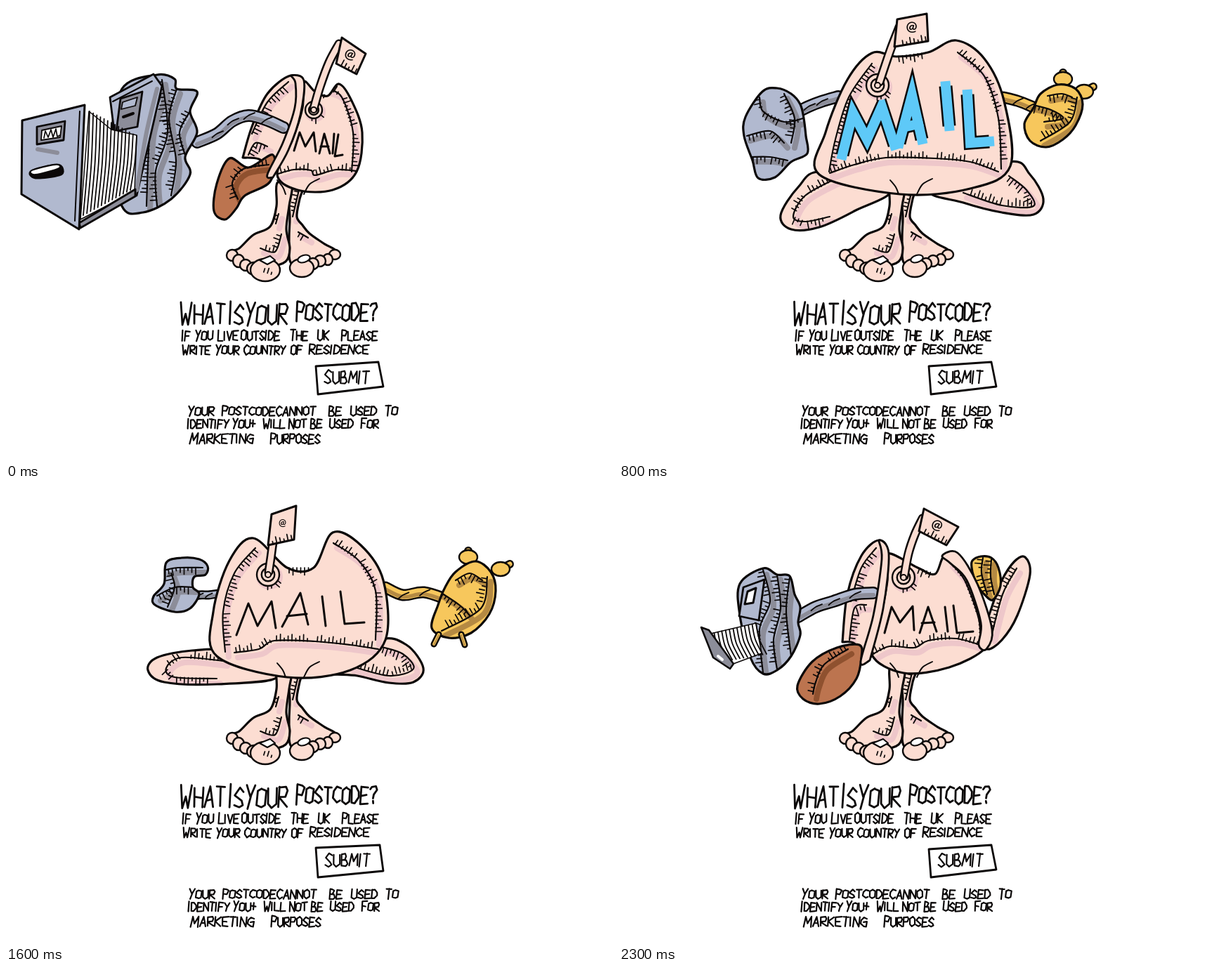
Write an HTML page with a canvas that moves like this. It is 864 px wide and 648 px high and loops after 2400 ms.

```html
<!DOCTYPE html>
<html lang="en">
<head>
<meta charset="utf-8">
<title>What is your postcode?</title>
<style>
html, body { margin: 0; width: 100%; height: 100%; overflow: hidden; background: #fff }
canvas { display: block }
</style>
</head>
<body>
<canvas width="864" height="648" role="img" aria-label="What is your postcode? If you live outside the UK please write your country of residence. Submit. Your postcode cannot be used to identify you &amp; will not be used for marketing purposes"></canvas>
<script>
const g = document.querySelector('canvas').getContext('2d');
const INK = '#0b0808', SKIN = '#fcddd2', PINK = '#eec7ca', STEEL = '#b1b9cf', SLATE = '#8c8d99',
  GOLD = '#f7c75c', OCHRE = '#b58a43', BROWN = '#bc744f', RUST = '#8f512f', WHITE = '#fff';
g.lineCap = g.lineJoin = 'round';

// "x,y x,y": smooth points; a trailing * makes one corner, a leading ! makes all corners
const pts = s => Array.isArray(s) ? s : s.replace('!', '').split(' ').flatMap(t => {
  const p = t.split(',').map(parseFloat);
  return s[0] == '!' || t.endsWith('*') ? [p, p] : [p];
});

function curve(p, closed) {
  const path = new Path2D(), n = p.length;
  const at = i => closed ? p[(i + n) % n] : p[Math.max(0, Math.min(n - 1, i))];
  path.moveTo(...p[0]);
  for (let i = 0; i < n - !closed; i++) {
    const [a, b, c, d] = [-1, 0, 1, 2].map(k => at(i + k));
    if (b[0] == c[0] && b[1] == c[1]) continue;
    path.bezierCurveTo(b[0] + (c[0] - a[0]) / 6, b[1] + (c[1] - a[1]) / 6,
      c[0] - (d[0] - b[0]) / 6, c[1] - (d[1] - b[1]) / 6, ...c);
  }
  if (closed) path.closePath();
  return path;
}
function stroke(path, w, color = INK) {
  g.lineWidth = w; g.strokeStyle = color; g.stroke(path);
}
const line = (s, w = 2.2, color) => stroke(curve(pts(s)), w, color);
function shape(s, fill, w = 2.8) {
  const path = curve(pts(s), true);
  g.fillStyle = fill; g.fill(path); stroke(path, w);
}
function oval(x, y, rx, ry, fill, w = 2.4, turn = 0) {
  g.beginPath(); g.ellipse(x, y, rx, ry, turn, 0, 7);
  g.fillStyle = fill; g.fill(); g.lineWidth = w; g.strokeStyle = INK; g.stroke();
}
// short strokes at right angles to the middle of a line
function comb(p, len = 8) {
  const path = new Path2D();
  let k = 0;
  for (let i = 1; i < p.length; i++) {
    const [x, y] = p[i - 1], dx = p[i][0] - x, dy = p[i][1] - y, d = Math.hypot(dx, dy);
    for (let s = 3; s < d * .85; s += 5.5, k++) {
      const l = len * (.75 + .35 * Math.sin(k * 2.1)) / d, u = s / d;
      path.moveTo(x + dx * u, y + dy * u);
      path.lineTo(x + dx * u - dy * l, y + dy * u + dx * l);
    }
  }
  stroke(path, 1.7);
}
function blob(s, fill, shade, lines = [], len = 8) {
  if (!s) return;
  const path = curve(pts(s), true);
  g.save();
  g.fillStyle = fill; g.fill(path); g.clip(path);
  g.translate(5, 7);
  lines.forEach(l => line(l, 8, shade));
  g.translate(-5, -7);
  lines.forEach(l => { comb(pts(l), len); line(l); });
  g.restore();
  stroke(path, 3.2);
}
function tube(s, fill, shade, w) {
  if (!s) return;
  const p = pts(s);
  line(p, w + 5); line(p, w, fill);
  line(p.map(([x, y]) => [x, y + w * .22]), w * .45, shade);
  for (let i = 1; i < p.length - 1; i++) {
    const [x, y] = p[i];
    line([[x + w * .7, y - w * .3], [x, y], [x - w * .5, y + w * .4]], 1.8);
  }
}
function files(n, x0, x1, y0, y1, b0, b1, lean) {
  for (let i = 0; i < n; i++) {
    const u = i / (n - 1), x = x0 + (x1 - x0) * u, y = y0 + (y1 - y0) * u, b = b0 + (b1 - b0) * u;
    line([[x, y], [x + lean * .3, (y + b) / 2], [x + lean, b]], 1.8);
  }
}

function cabinet() {
  shape('!148,130 210,97 222,114 186,270 166,276', STEEL);
  line('215,118 200,180 186,262', 6, SLATE);
  line('152,136 208,107', 2);
  shape('!163,132 194,122 187,172 157,178', SLATE);
  shape('!166,137 187,130 184,142 164,147', STEEL, 1.8);
  line('167,158 181,153', 4);
  shape('!118,150 150,176 186,184 183,264 106,304', WHITE, 1.5);
  files(14, 119, 186, 150, 185, 298, 262, -9);
  shape('!104,309 184,261 184,271 106,316', SLATE);
  shape('!23,163 112,141 104,318 22,268', STEEL, 3);
  line('105,150 98,306', 2);
  shape('!44,172 84,164 82,191 44,197', SLATE);
  shape('!51,177 79,171 77,187 50,191', WHITE, 1.8);
  line('!54,188 56,178 60,187 64,176 67,187 71,175 73,186 77,184', 1.7);
  line('45,204 73,209', 6, SLATE);
  shape('36,235 72,226 81,233 76,241 42,245', INK);
  shape('37,234 70,226 75,231 42,240', WHITE, 1.8);
}
function drawer() {
  shape('!177,140 207,129 199,187 171,181', STEEL);
  shape('!183,146 195,141 191,162 179,164', WHITE, 3);
  shape('!126,207 195,191 203,234 160,250', WHITE, 1.5);
  files(13, 130, 195, 206, 192, 246, 235, 15);
  shape('!117,197 128,201 163,249 158,256 134,240', SLATE, 2.5);
  line('141,238 147,243', 4, WHITE);
}
function alarm() {
  tube('658,245 645,268', GOLD, OCHRE, 4); oval(644, 269, 5, 5, WHITE);
  tube('703,246 712,272', GOLD, OCHRE, 4);
  tube('745,100 782,82 792,64', GOLD, OCHRE, 9); oval(793, 63, 9, 5, GOLD);
  shape('738,84 762,68 792,78 801,98 780,112 748,102', GOLD);
  oval(686, 49, 13, 8, GOLD); shape('!680,54 692,54 697,68 676,68', GOLD);
  shape('652,92 658,72 690,63 722,72 736,88 715,102 670,104', GOLD);
  oval(692, 88, 31, 10, OCHRE); line('!694,82 686,82 686,93 694,93', 2);
  line('686,88 692,88', 2);
  oval(700, 170, 79, 76, GOLD, 3); oval(704, 169, 70, 66, OCHRE);
  oval(710, 170, 63, 62, GOLD);
  comb(pts('650,160 665,135 695,120 730,125'), -9);
  oval(686, 170, 24, 20, OCHRE); oval(680, 169, 12, 11, GOLD);
  shape('!716,166 755,82 803,122 738,176', GOLD, 3.5);
  line('758,92 733,148', 6, OCHRE); comb(pts('735,150 780,120'), -9);
  shape('!690,200 716,277 768,250 734,192', GOLD, 3.5);
  line('718,212 727,262', 9, OCHRE); comb(pts('722,268 735,225'), 10);
  oval(712, 180, 29, 27, GOLD, 3.5); oval(713, 180, 14, 13, GOLD, 3);
}

// key drawings, ordered from the left-hand swing (0) to the right-hand swing (12)
const KEYS = [1, 2, 4, 7, 9, 11];
const POSES = [{
  body: '424,108 440,122 458,128 474,111 492,135 507,180 499,236 465,262 415,262 386,240 408,190 422,145',
  inner: ['384,240 410,233 434,234 440,241 470,233 499,235', '459,118 478,130 494,180 492,236'],
  inside: '337,216* 350,172 372,125 405,99 424,112 420,150 405,200 385,234 360,218',
  gills: ['350,182 372,137 402,108', '345,212 355,195 372,200'],
  rim: '406,99 424,106 419,155 402,205 380,244* 372,240 394,195 411,145 412,110',
  doorL: '380,212 345,230 318,217 300,253 296,292 312,304 328,288 340,270 376,250',
  dl: ['374,226 338,232 322,252 330,275'], tongue: 'L',
  hub: '438,148', pole: '438,146 447,115 460,80 474,54', flag: '!478,45 512,68 499,97 470,82',
  text: ['!410,206 418,180 426,200 438,180 441,207', '!446,210 453,182 461,210', '!448,200 459,200', '!467,182 465,210', '!473,183 468,214 479,212'],
  armL: '395,173 370,162 345,156 322,164 300,182 272,194',
  hand: '165,118 215,98 240,104 243,118 272,122 262,150 272,180 255,215 262,240 235,275 195,294 165,285 150,200',
  fingers: ['205,105 220,125 205,180 200,285', '222,105 230,180 213,235 215,285', '243,118 232,160 242,220 235,270', '262,150 247,180 256,215'],
  art: cabinet
}, {
  body: '382,92 425,112 450,121 466,94 502,125 527,190 522,226 470,254 405,262 360,236 372,185 382,130',
  inner: ['360,236 385,224 420,226 440,216 480,213 520,224', '470,104 492,130 512,185 514,220'],
  inside: '318,218* 325,150 345,95 370,73 383,95 372,180 355,245 335,220',
  gills: ['330,160 345,112 366,84', '328,215 335,170 352,165'],
  rim: '370,73 384,92 376,170 357,244* 344,246 362,180 374,100',
  rimR: '460,95 482,91 510,135 531,200 523,228 512,222 515,190 495,130 472,106',
  doorL: '342,222 310,226 275,246 254,280 262,299 285,306 315,295 338,270 345,240',
  dl: ['326,228 292,250 280,275 276,292'], tongue: 'L',
  doorR: '578,97 585,122 567,180 545,215 524,228 520,205 530,170 545,130 563,103',
  dr: ['566,113 546,150 530,210'],
  hub: '405,126', pole: '406,124 412,92 421,65 432,42', flag: '!434,28 483,54 466,80 427,60',
  text: ['!378,205 388,168 400,190 418,167 420,201', '!428,205 440,168 452,203', '!431,191 449,190', '!464,168 468,203', '!476,166 481,205 504,203'],
  armL: '362,148 335,150 305,160 280,168 255,182',
  hand: '172,135 205,113 225,122 243,124 250,150 258,168 255,190 258,208 245,238 225,258 205,263 187,240 172,180',
  fingers: ['205,115 215,160 200,200 205,262', '225,122 230,170 220,215 225,257', '243,126 238,175 245,238'],
  clock: '503,102 515,96 530,98 540,112 543,138 532,158 520,150 512,140 505,125 502,112',
  grip: ['518,98 516,120 524,150', '530,100 529,125 534,150'],
  art: drawer
}, {
  body: '365,67 385,88 440,85 468,54 510,76 543,140 549,222 500,260 400,268 322,230 318,170 333,100',
  inner: ['340,224 375,214 420,230 450,222 515,217 538,234', '357,92 337,130 328,180 336,222', '472,72 510,108 532,165 535,220'],
  doorL: '322,226 280,236 240,275 240,306 290,308 345,288 385,262',
  dl: ['345,235 290,245 252,278 255,298 295,298'],
  doorR: '548,206 600,208 645,230 630,254 560,266 490,268 445,258',
  dr: ['550,217 595,218 624,236 560,256 490,256'],
  hub: '381,112', pole: '383,108 389,80 396,55 407,34', flag: '!402,21 452,15 455,62 400,66',
  text: ['!342,203 352,162 369,191 384,157 396,206', '!402,182 410,138 445,180', '!400,172 439,168', '!465,137 469,189', '!484,142 490,192 520,190'],
  armL: '325,132 300,135 278,144 250,160',
  hand: '180,140 200,130 228,124 252,132 268,148 264,175 272,200 255,212 232,240 205,244 192,230 186,205 190,172',
  fingers: ['186,150 215,148 240,135', '190,175 215,190 188,205', '215,148 212,190 220,240', '240,150 245,185 255,212'],
  tail: '!165,196 186,190 192,240 175,245',
  armR: '537,126 560,122 585,129 610,124',
  clock: '605,88 630,82 655,92 672,120 668,150 650,178 625,187 602,176 595,150 600,115',
  grip: ['585,122 625,115 650,130 630,150', '664,100 660,145 625,178', '612,100 635,97 652,105'], bells: '625,76 662,95'
}, {
  body: '360,67 395,72 440,66 480,49 520,75 548,135 557,228 500,260 400,268 285,240 294,180 325,105',
  inner: ['300,238 335,226 380,216 450,217 500,222 540,236', '360,82 327,130 308,190 299,236', '482,66 520,100 540,160 544,232'],
  doorL: '288,236 255,258 230,298 245,318 285,315 335,292 385,262',
  dl: ['310,245 265,270 248,300 265,307 300,300'],
  doorR: '555,222 585,240 604,275 590,297 545,294 490,280 445,262',
  dr: ['555,242 580,262 590,285 545,284 490,266'],
  hub: '368,113', pole: '371,108 379,84 388,58 399,30', flag: '!396,19 438,11 440,50 392,58',
  text: ['!318,212 333,152 353,190 374,143 392,198', '!399,195 417,127 431,190', '!408,172 426,168', '!465,114 470,171', '!496,126 500,195 527,193'],
  armL: '312,129 288,136 270,143 250,153',
  hand: '204,122 225,117 245,125 258,140 263,160 266,185 268,210 245,222 222,244 198,245 190,220 178,185 180,158',
  fingers: ['200,130 205,150 235,165 262,160', '182,185 215,178 235,195', '188,215 215,215 240,220', '235,125 250,160 245,195'],
  armR: '547,130 567,135 585,142 605,152',
  clock: '600,125 625,112 650,118 660,140 650,170 632,190 608,201 585,192 577,168 590,145',
  grip: ['585,140 615,148 632,160 605,165', '652,130 642,165 600,192', '610,128 630,125 645,130'], bells: '632,104 662,122'
}, {
  body: '352,70 400,112 438,112 465,62 505,80 537,130 540,215 490,258 400,268 300,238 295,175 318,102',
  inner: ['325,233 360,228 382,216 440,217 490,222 530,228', '355,84 325,120 309,175 312,232', '466,77 502,102 526,145 526,215'],
  doorL: '320,232 265,230 215,240 202,258 225,275 300,278 385,268',
  dl: ['310,245 250,240 228,255 240,268 300,270'],
  doorR: '530,215 570,222 594,255 580,275 545,276 500,266 450,258',
  dr: ['535,225 565,235 580,256 545,266 490,252'],
  hub: '373,122', pole: '374,118 377,98 380,76 386,40', flag: '!378,36 413,24 410,72 373,80',
  text: ['!328,208 345,163 358,195 378,160 384,198', '!393,196 419,148 430,193', '!400,181 428,178', '!450,153 455,195', '!476,146 482,192 510,190'],
  armL: '303,149 288,151 275,151 255,156',
  hand: '228,105 250,98 275,100 287,110 284,122 268,125 266,140 275,150 262,170 240,175 212,165 210,153 225,135',
  fingers: ['228,115 245,112 280,112', '215,152 240,140 266,140', '235,120 240,140 230,168'],
  armR: '540,140 565,151 595,147 630,158',
  clock: '640,118 668,103 690,118 697,145 688,178 662,205 630,212 606,198 615,165 625,140',
  grip: ['615,145 645,165 660,180', '685,125 676,170 620,202', '640,130 660,120 678,130'], bells: '658,97 704,114',
  art() {
    tube('616,207 609,221', GOLD, OCHRE, 4);
    tube('648,207 653,222', GOLD, OCHRE, 4);
  }
}, {
  body: '352,103 385,130 412,122 422,115 428,150 445,195 455,235 440,258 400,262 317,246 315,195 330,135',
  inner: ['318,246 345,228 380,218 415,217 440,224 456,236', '357,114 338,142 327,190 330,235'],
  inside: '422,115 437,92 462,120 485,175 502,215 495,242 472,260 445,258',
  gills: ['445,108 465,145 490,205', '455,205 478,192 485,180'],
  rim: '437,92 423,107 430,150 446,200 465,245* 476,240 457,190 443,140 449,102',
  doorR: '455,224 480,218 515,208 545,220 558,238 545,245 520,243 490,240 465,235',
  dr: ['550,236 520,224 480,226'], tongue: 'R',
  hub: '361,152', pole: '363,148 370,128 379,106 392,80', flag: '!358,45 400,68 384,97 346,77',
  text: ['!342,225 347,195 358,216 372,192 371,222', '!376,219 385,190 391,217', '!378,208 390,208', '!396,191 398,214', '!403,190 406,213 420,208'],
  armR: '452,180 480,162 515,146 555,148 590,146', wide: 17,
  clock: '625,118 680,95 745,105 778,145 775,195 740,235 690,248 625,232 600,185 598,140',
  grip: ['596,150 615,145 625,180 608,190', '625,125 615,160 632,215', '610,195 632,215 660,240'],
  art: alarm
}];

function feet() {
  blob('402,252 404,300 403,330 405,365 425,368 448,360 470,350 452,338 432,324 422,312 414,300 418,275 424,252', SKIN, PINK, ['417,262 408,300', '416,322 430,330']);
  [[468, 354, 8, 7], [458, 361, 7, 8], [447, 363, 8, 8], [437, 367, 8, 8], [421, 373, 17, 13]].forEach(t => oval(...t, SKIN));
  oval(424, 360, 9, 5, WHITE, 2.2, -.3);
  blob('386,252 385,285 376,314 352,326 332,345 318,352 345,366 375,370 398,364 404,345 399,318 403,285 407,252', SKIN, PINK, ['392,325 383,350 362,345', '388,296 384,310']);
  [[322, 355, 8, 8], [331, 363, 8, 9], [341, 369, 8, 8], [353, 374, 10, 9], [369, 376, 21, 16]].forEach(t => oval(...t, SKIN));
  shape('!361,362 376,356 383,362 372,368', WHITE, 2);
  comb(pts('364,378 380,383'), -7);
}

function scene(p) {
  let i = 0;
  while (i < 4 && KEYS[i + 1] <= p) i++;
  const a = POSES[i], b = POSES[i + 1];
  const t = Math.max(-.03, Math.min(1.03, (p - KEYS[i]) / (KEYS[i + 1] - KEYS[i])));
  const near = t < .5 ? a : b;
  const mix = (u, v) => {
    const from = u && pts(u), to = v && pts(v);
    if (!from || !to || from.length != to.length) return t < .5 ? from : to;
    return from.map((q, k) => q.map((n, c) => n + (to[k][c] - n) * t));
  };
  const get = key => mix(a[key], b[key]);
  const list = key => [0, 1, 2, 3, 4].map(k => mix(a[key]?.[k], b[key]?.[k])).filter(Boolean);
  const door = side => blob(get('door' + side), ...(near.tongue == side ? [BROWN, RUST] : [SKIN, PINK]),
    list('d' + side.toLowerCase()), 10);

  blob(get('inside'), SKIN, PINK, list('gills'), 10);
  door('L'); door('R');
  tube(get('armL'), STEEL, SLATE, p > 8 ? 8 : 13);
  if (near.tail) {
    shape(near.tail, STEEL);
    shape('!172,201 182,198 185,222 177,225', WHITE, 1.8);
  }
  blob(get('hand'), STEEL, SLATE, list('fingers'), 9);
  tube(get('armR'), GOLD, OCHRE, near.wide || 12);
  (get('bells') || []).forEach(([x, y], k) => {
    tube([[x, y], [x + k * 13, y - 9 + k * 2]], GOLD, OCHRE, 7);
    oval(x, y, 13, 10, GOLD);
  });
  blob(get('clock'), GOLD, OCHRE, list('grip'), 10);
  near.art?.();

  g.save();
  if (p > 10) g.translate(-3, -2);
  feet();
  g.restore();

  const body = get('body');
  blob(body, SKIN, PINK, list('inner'), -9);
  line([[386, 248], [394, 258], [398, 268]], 2);
  line([[424, 268], [432, 254], [446, 246]], 2);
  comb([body[1], body[2]], 10);
  ['rim', 'rimR'].forEach(k => get(k) && shape(get(k), SKIN));

  // lettering on the box
  const text = list('text').map(s => curve(s));
  if (p == 7) {
    g.lineCap = 'butt'; g.lineJoin = 'miter';
    text.forEach(s => stroke(s, 19));
    g.lineCap = 'square';
    text.forEach(s => stroke(s, 14, '#5ec9f8'));
    g.lineCap = g.lineJoin = 'round';
  } else text.forEach(s => stroke(s, 3));

  // flag
  const [[x, y]] = get('hub'), flag = get('flag'), r = p < 2 ? 12 : 16;
  oval(x + 2, y + 3, r + 3, r + 2, PINK, 0.01);
  oval(x, y, r, r, SKIN); oval(x, y, r * .58, r * .58, SKIN);
  comb([[x + r, y + r * .4], [x + r * .5, y + r], [x - r * .5, y + r]], -7);
  line(get('pole'), 13); line(get('pole'), 8, SKIN);
  shape(flag, SKIN, 3);
  comb([flag[4], flag[6]], 9);
  oval(x, y, 4, 4, SKIN, 2);
  const mid = c => flag.reduce((s, q) => s + q[c], 0) / flag.length;
  g.save();
  g.translate(mid(0), mid(1) - 4); g.rotate(p < 4 ? .3 : 0);
  g.fillStyle = INK; g.textAlign = 'center'; g.textBaseline = 'middle';
  g.font = `700 ${p > 8 ? 13 : 19}px Lato, sans-serif`;
  g.fillText('@', 0, 0);
  g.restore();
}

// pen alphabet on a 4 by 6 grid, two digits a point
const PEN = {
  A: '062046 1434', B: '000636453303 0020312303', C: '412002042645', D: '0006 002042442606', E: '40000646 0333',
  F: '400006 0333', G: '4120020426464323', H: '0006 4046 0343', I: '0006', K: '0006 400346', L: '000646',
  M: '0610244046', N: '06004640', O: '20010526454120', P: '0006 0030413303', R: '0006 003041330346',
  S: '41200234452605', T: '0040 2026', U: '0005264540', V: '002640', W: '0016233640', Y: '002340 2316',
  '?': '011030412324 2526', '&': '2125 0343'
};
// baseline, height, advance, words with their left edges
const COPY = [
  [453, 28, 15.5, '248:WHAT 319:IS 342:YOUR'], [448, 24, 13, '414:POSTCODE?'],
  [476, 13, 8.7, '251:IF 270:YOU 302:LIVE 335:OUTSIDE 405:THE 444:UK 478:PLEASE'],
  [496, 12, 8.7, '251:WRITE 299:YOUR 339:COUNTRY 406:OF'], [495, 12, 10.2, '432:RESIDENCE'],
  [537, 17, 11.3, '454:SUBMIT'],
  [583, 12, 9.6, '260:YOUR 308:POSTCODE 385:CANNOT 460:BE 491:USED 540:TO'],
  [601, 12, 8.7, '259:IDENTIFY 323:YOU 348:& 366:WILL 403:NOT 434:BE 461:USED 506:FOR'],
  [623, 13, 10.5, '262:MARKETING'], [623, 13, 9, '377:PURPOSES']
];
function lettering(boil) {
  COPY.forEach(([base, h, adv, words], row) => words.split(' ').forEach(item => {
    let [x, word] = item.split(':');
    x = +x + (boil && row > 1 ? 1 : 0);
    [...word].forEach((ch, k) => {
      const size = ch == 'W' || ch == 'M' ? 1.3 : ch == 'I' ? .45 : 1;
      const w = adv * .78 * (ch == 'I' ? 1 : size) / 4, v = h * (k ? 1 : 1.16) / 6;
      const y = base - h * (k ? 1 : 1.12) + Math.sin(k * 2.3 + row + x) * h * .04;
      const path = new Path2D();
      PEN[ch].split(' ').forEach((run, r) => run.match(/../g).forEach(([px, py], n) => {
        const wob = Math.sin(n * 3 + k * 5 + r + boil * .4) * .2;
        path[n ? 'lineTo' : 'moveTo'](x + (+px + wob + (3 - py) * .08) * w, y + (+py - wob) * v);
      }));
      stroke(path, h > 20 ? 2.8 : 2.2);
      x += adv * size;
    });
  }));
  const k = boil == 1 ? 2 : 0;
  line(`!441,${513 - k} ${530 + k},507 537,${542 + k} 444,553 441,${513 - k}`, 2.8);
}

let shown = -1;
function tick(now) {
  const step = Math.floor(now / 100) % 24;
  if (step != shown) {
    shown = step;
    g.fillStyle = WHITE;
    g.fillRect(0, 0, 864, 648);
    const q = (step + 23) % 24;
    scene(q > 12 ? 24 - q : q);
    lettering(step % 3);
  }
  requestAnimationFrame(tick);
}
const start = performance.now();
tick(0);
requestAnimationFrame(function run() {
  tick = now => now;
  const draw = () => {
    const step = Math.floor((performance.now() - start) / 100) % 24;
    if (step != shown) {
      shown = step;
      g.fillStyle = WHITE;
      g.fillRect(0, 0, 864, 648);
      const q = (step + 23) % 24;
      scene(q > 12 ? 24 - q : q);
      lettering(step % 3);
    }
    requestAnimationFrame(draw);
  };
  draw();
});
</script>
</body>
</html>
```
